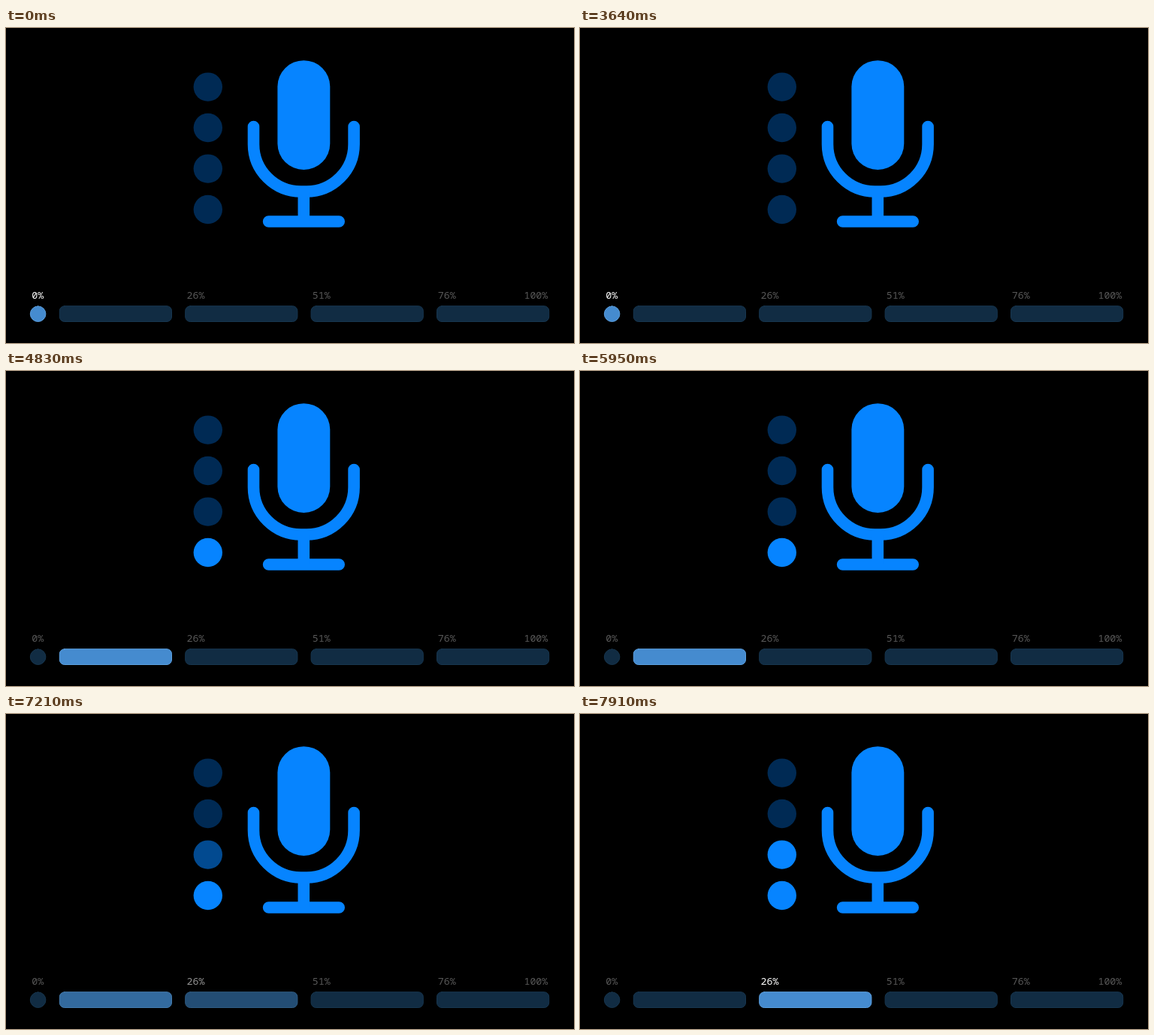
Recreate the animation shown at these times as an HTML page with a canvas. Size 756 px wide and 420 px high, loop 8000 ms.

```html
<!DOCTYPE html>
<html lang="en">
<head>
<meta charset="utf-8">
<title>Microphone level</title>
<style>
html, body { margin: 0; width: 100%; height: 100%; overflow: hidden; background: #000; }
canvas { display: block; width: 756px; height: 420px; }
</style>
</head>
<body>
<canvas id="stage"></canvas>
<script>
const W = 756, H = 420, LOOP = 8000, STEP = 70, FADE = 350;
const canvas = document.getElementById('stage');
const ctx = canvas.getContext('2d');
const dpr = window.devicePixelRatio || 1;
canvas.width = W * dpr;
canvas.height = H * dpr;
ctx.scale(dpr, dpr);

const BLUE = [6, 132, 255];
const DOT_OFF = [0, 42, 84];
const BAR_OFF = [17, 44, 67], BAR_ON = [69, 139, 207];
const EDGE_OFF = [23, 54, 79], EDGE_ON = [92, 160, 224];
const TEXT_OFF = [88, 88, 88], TEXT_ON = [255, 255, 255];

const DOTS_Y = [242, 187.6, 133, 78.6];
const BARS_X = [70.8, 238.2, 405.6, 573];
const LABELS = [['0%', 34.3, 0], ['26%', 240.6, 2], ['51%', 407.7, 3], ['76%', 574.8, 4], ['100%', 689.4, 5]];

const clamp = v => Math.min(1, Math.max(0, v));
const smooth = v => v * v * (3 - 2 * v);
const mix = (a, b, k) => `rgb(${a.map((v, i) => Math.round(v + (b[i] - v) * k)).join(',')})`;
const fade = (t, start) => smooth(clamp((t - start) / FADE));

function circle(x, y, r, color) {
  ctx.fillStyle = color;
  ctx.beginPath();
  ctx.arc(x, y, r, 0, Math.PI * 2);
  ctx.fill();
}

function roundBox(x, y, w, h, r) {
  ctx.beginPath();
  ctx.roundRect(x, y, w, h, r);
}

function drawMic() {
  ctx.fillStyle = ctx.strokeStyle = mix(BLUE, BLUE, 0);
  roundBox(361.4, 43.2, 69.9, 145.8, 34.9);
  ctx.fill();

  ctx.lineWidth = 15.6;
  ctx.lineCap = 'round';
  ctx.beginPath();
  ctx.moveTo(329.5, 131.5);
  ctx.lineTo(329.5, 155);
  ctx.arcTo(329.5, 218, 392.5, 218, 63);
  ctx.lineTo(400, 218);
  ctx.arcTo(463.1, 218, 463.1, 155, 63);
  ctx.lineTo(463.1, 131.5);
  ctx.moveTo(349.6, 258);
  ctx.lineTo(443.2, 258);
  ctx.stroke();
  ctx.fillRect(388.5, 218, 15.6, 40);
}

function drawMeter(glow) {
  ctx.lineWidth = 1;
  for (let i = 0; i < 5; i++) {
    const k = glow[i];
    if (i === 0) roundBox(32.3, 370.9, 20.6, 20.6, 10.3);
    else roundBox(BARS_X[i - 1] + 0.5, 370.7, 149.2, 20.8, 6.5);
    ctx.fillStyle = mix(BAR_OFF, BAR_ON, k);
    ctx.strokeStyle = mix(EDGE_OFF, EDGE_ON, k);
    ctx.fill();
    ctx.stroke();
  }
  ctx.font = '13.3px "Noto Sans Mono", "DejaVu Sans Mono", monospace';
  ctx.textBaseline = 'alphabetic';
  for (const [text, x, slot] of LABELS) {
    ctx.fillStyle = mix(TEXT_OFF, TEXT_ON, glow[slot] || 0);
    ctx.fillText(text, x, 360.6);
  }
}

function draw(now) {
  const t = Math.floor((now % LOOP) / STEP) * STEP;
  const a = fade(t, 3640), b = fade(t, 7070);
  const level = [a, b, 0, 0];

  ctx.fillStyle = '#000';
  ctx.fillRect(0, 0, W, H);
  DOTS_Y.forEach((y, i) => circle(268.8, y, 19.2, mix(DOT_OFF, BLUE, level[i])));
  drawMic();
  drawMeter([1 - a, a - b, b, 0, 0]);
}

let start;
function tick(now) {
  if (start === undefined) start = now;
  draw(Math.max(0, now - start));
  requestAnimationFrame(tick);
}
draw(0);
requestAnimationFrame(tick);
</script>
</body>
</html>
```
